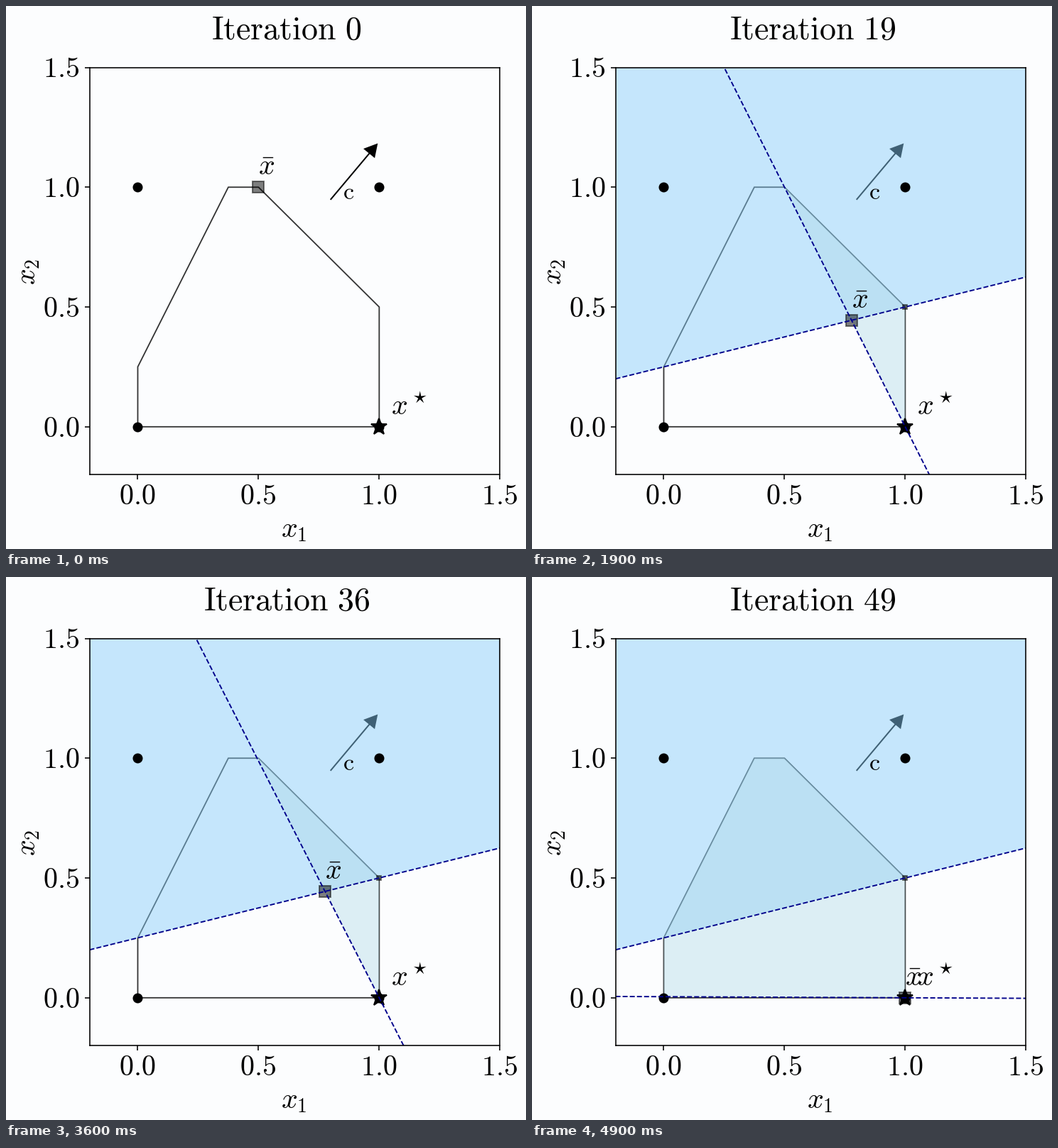
Write a matplotlib script that moves like this. It is 732 px wide and 765 px high and loops after 5 s.

```python
import numpy as np
import matplotlib.pyplot as plt
from matplotlib.animation import FuncAnimation

plt.rcParams["mathtext.fontset"] = "cm"

W, H, DPI = 732, 765, 128
PX = 72 / DPI  # points per pixel
LEFT, RIGHT, TOP, BOTTOM = 117.5, 695.3, 86.5, 660.3
LOW, HIGH = -0.2, 1.5
FRAMES, INTERVAL = 50, 100

HULL = [(0, 0), (1, 0), (1, 0.5), (0.5, 1), (0.375, 1), (0, 0.25)]
COST_RATIO = 0.836  # objective slope; flatter cuts make (1, 0) optimal
LINE = dict(color="#00008b", lw=1.9 * PX, ls="--", zorder=2.5)

fig = plt.figure(figsize=(W / DPI, H / DPI), dpi=DPI, facecolor="#fcfdfe")
ax = fig.add_axes([LEFT / W, 1 - BOTTOM / H, (RIGHT - LEFT) / W, (BOTTOM - TOP) / H],
                  facecolor="#fcfdfe")
ax.set(xlim=(LOW, HIGH), ylim=(LOW, HIGH))
ax.set_xticks([0, 0.5, 1, 1.5], labels=[])
ax.set_yticks([0, 0.5, 1, 1.5], labels=[])
ax.tick_params(length=7 * PX, width=1.6 * PX)
for spine in ax.spines.values():
    spine.set_linewidth(1.6 * PX)


def stage_text(x, y, text, size=40, ha="center", **style):
    """Text with its baseline at a pixel position, y counted downwards."""
    return fig.text(x / W, 1 - y / H, text, size=size * PX, ha=ha, va="baseline", **style)


def plot_text(x, y, text, size=40):
    return ax.text(x, y, text, size=size * PX, ha="left", va="baseline")


def marker(x, y, shape, size, **style):
    return ax.plot([x], [y], shape, color="black", ms=size * PX, mew=2 * PX, **style)[0]


def area(points, color, alpha):
    patch = plt.Polygon(points, facecolor=color, edgecolor="none", alpha=alpha)
    return ax.add_patch(patch)


def steepness(k):
    """Slope of the tilting cut: constant, then falling ever faster to zero."""
    roots = np.sqrt([0, 1, 7, 9, 13])
    slopes = [0.0045, 0.69, 1.555, 1.703, 1.977]
    left = np.sqrt(FRAMES - 1 - k)
    if left > roots[-1]:
        return 2.0
    return np.interp(left, roots, slopes)


def cut_off(m):
    """Part of the hull above the line y = m (1 - x)."""
    kept = []
    for p, q in zip(HULL, HULL[1:] + HULL[:1]):
        p, q = np.array(p, float), np.array(q, float)
        dp, dq = (v[1] + m * (v[0] - 1) for v in (p, q))
        if dp >= 0:
            kept.append(p)
        if dp * dq < 0:
            kept.append(p + (q - p) * dp / (dp - dq))
    return np.array(kept)


# Axis labels
for value in (0, 0.5, 1, 1.5):
    share = (value - LOW) / (HIGH - LOW)
    number = rf"$\mathrm{{{value:.1f}}}$"
    stage_text(LEFT + share * (RIGHT - LEFT) - 1, 701.5, number)
    stage_text(103.5, BOTTOM - share * (BOTTOM - TOP) + 14, number, ha="right")
stage_text(405.5, 748, "$x_1$")
stage_text(41, 374.5, "$x_2$", rotation=90, rotation_mode="anchor")
title = stage_text(395, 46.5, "", size=46)

# Hull and objective arrow, both beneath the tinted areas
ax.add_patch(plt.Polygon(HULL, fill=False, edgecolor="black", lw=1.8 * PX, alpha=0.8))
ax.plot([0.8, 0.96], [0.95, 1.142], color="black", lw=2 * PX, zorder=1)
tip, base = np.array([0.994, 1.183]), np.array([0.958, 1.141])
side = np.array([0.0235, -0.0195])
area([tip, base + side, base - side], "black", 1)
plot_text(0.85, 0.95, r"$\mathrm{c}$", size=34)

flat = np.array([LOW, HIGH])
removed = area([(LOW, 0.2), (HIGH, 0.625), (HIGH, HIGH), (LOW, HIGH)], "lightskyblue", 0.47)
tinted = area(HULL, "lightblue", 0.4)

# Points
for x, y in [(0, 0), (1, 0), (0, 1), (1, 1)]:
    marker(x, y, "o", 12)
marker(1, 0, "*", 24)
plot_text(1.05, 0.05, r"$x^\star$")
vertex = marker(1, 0.5, "s", 6.5, alpha=0.5)
solution = marker(0.5, 1, "s", 16.5, alpha=0.5)
solution_name = plot_text(0.5, 1.05, r"$\bar{x}$")

flat_cut, = ax.plot(flat, 0.25 + 0.25 * flat, **LINE)
tilting_cut, = ax.plot(flat, flat, **LINE)


def draw(k):
    title.set_text(rf"$\mathrm{{Iteration\ {k}}}$")
    for artist in (removed, tinted, vertex, flat_cut, tilting_cut):
        artist.set_visible(k > 0)
    x, y = 0.5, 1.0
    if k > 0:
        m = steepness(k)
        tilting_cut.set_ydata(m * (1 - flat))
        tinted.set_xy(cut_off(m))
        x = (m - 0.25) / (m + 0.25) if m > COST_RATIO else 1.0
        y = m * (1 - x)
    solution.set_data([x], [y])
    solution_name.set_position((x, y + 0.05))
    return []


anim = FuncAnimation(fig, draw, frames=FRAMES, interval=INTERVAL, repeat=True, repeat_delay=0)
plt.show()
```
